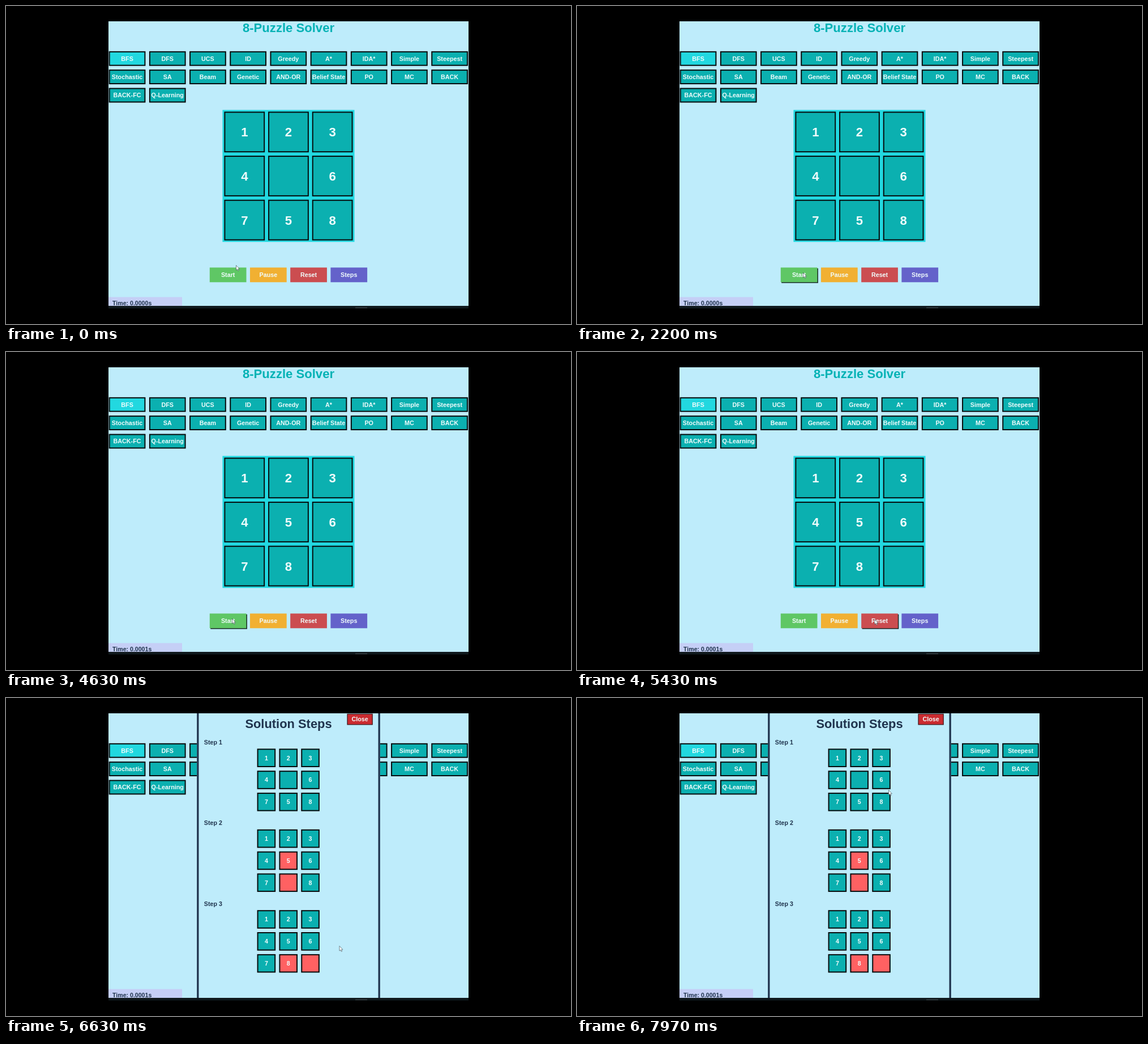
These frames come from a looping animation (998x561 px, 8 s). An HTML page:

```html
<!DOCTYPE html>
<html lang="en">
<head>
<meta charset="utf-8">
<title>Puzzle solver</title>
<style>
html, body { margin: 0; width: 100%; height: 100%; overflow: hidden; background: #000; }
svg { display: block; width: 100%; height: 100%; }
text { font-family: "Liberation Sans", Arial, sans-serif; font-weight: bold; }
</style>
</head>
<body>
<svg id="stage" viewBox="0 0 998 561"></svg>
<script>
const LOOP = 8000;
const NS = "http://www.w3.org/2000/svg";
const SKY = "#beecfb", TEAL = "#0bb0b0", CYAN = "#22d8e0", INK = "#1f334d", PALE = "#f0fcfc";
const UNIT = 0.6472; // app pixels to stage pixels
const BTN_W = 100 * UNIT, BTN_H = 40 * UNIT, BTN_STEP = 110 * UNIT;

const stage = document.getElementById("stage");

function add(parent, tag, attrs) {
  const el = document.createElementNS(NS, tag);
  for (const key in attrs) el.setAttribute(key, attrs[key]);
  parent.appendChild(el);
  return el;
}

const group = parent => add(parent, "g", {});

function rect(parent, x, y, width, height, fill) {
  return add(parent, "rect", { x, y, width, height, fill });
}

// Filled box whose border lies inside its edges.
function box(parent, x, y, w, h, fill, line = 2, stroke = "#050b0c") {
  return add(parent, "rect", {
    x: x + line / 2, y: y + line / 2, width: w - line, height: h - line,
    fill, stroke, "stroke-width": line
  });
}

function label(parent, str, x, midY, size, fill, anchor = "middle") {
  const el = add(parent, "text", {
    x, y: midY + size * 0.36, "font-size": size, fill, "text-anchor": anchor
  });
  el.textContent = str;
  return el;
}

function tile(parent, x, y, side, size, fill) {
  box(parent, x, y, side, side, fill);
  return label(parent, "", x + side / 2, y + side / 2, size, PALE);
}

const show = (el, on) => el.setAttribute("visibility", on ? "visible" : "hidden");

// App window
rect(stage, 0, 0, 998, 561, "#000");
rect(stage, 181, 27, 636, 502, SKY);
rect(stage, 181, 529, 636, 4.6, "#10191d");
rect(stage, 617, 531.8, 21, 1, "#4a5254");
label(stage, "8-Puzzle Solver", 499, 38.2, 22.1, "#04b2b5");

const methods = ["BFS", "DFS", "UCS", "ID", "Greedy", "A*", "IDA*", "Simple", "Steepest",
  "Stochastic", "SA", "Beam", "Genetic", "AND-OR", "Belief State", "PO", "MC", "BACK",
  "BACK-FC", "Q-Learning"];
methods.forEach((name, i) => {
  const x = 181.7 + (i % 9) * BTN_STEP;
  const y = 79.8 + Math.floor(i / 9) * 50 * UNIT;
  box(stage, x, y, BTN_W, BTN_H, i ? TEAL : CYAN);
  label(stage, name, x + BTN_W / 2, y + BTN_H / 2, 10.75, PALE);
});

// Main board
const boards = ["1234 6758", "1234567 8", "12345678 "];
rect(stage, 382.4, 183.4, 233.1, 232.8, CYAN);
const cells = [...boards[0]].map((_, i) =>
  tile(stage, 385.4 + (i % 3) * 120 * UNIT, 186.4 + Math.floor(i / 3) * 120 * UNIT, 71.8, 22.2, TEAL));

// Controls
const controls = [["Start", "#5fc765"], ["Pause", "#f1b032"], ["Reset", "#cb4d50"], ["Steps", "#6462ca"]];
const shadows = controls.map(([name, fill], i) => {
  const x = 359.8 + i * BTN_STEP, y = 461.4;
  const shadow = rect(stage, x + 1.4, y + 1.4, BTN_W, BTN_H, "#14201f");
  rect(stage, x, y, BTN_W, BTN_H, fill);
  label(stage, name, x + BTN_W / 2, y + BTN_H / 2 - 0.1, 10.75, PALE);
  return shadow;
});

rect(stage, 181, 513.5, 130, 15.5, "#c5cff6");
const clock = label(stage, "", 188, 524.4, 10.6, INK, "start");

// Solution panel
const panel = group(stage);
rect(panel, 337.2, 27, 323.6, 502, SKY);
rect(panel, 337.2, 27, 3.3, 502, INK);
rect(panel, 657.5, 27, 3.3, 502, INK);
label(panel, "Solution Steps", 499, 44.8, 21.9, INK);
box(panel, 602.4, 27.7, 45.4, 19.8, "#cb2b30", 1.2, "#3a1518");
label(panel, "Close", 625.2, 37.5, 10.75, PALE);
boards.forEach((board, n) => {
  const top = 89.4 + n * 142.4;
  label(panel, "Step " + (n + 1), 349.8, top - 11.4, 10.7, INK, "start");
  [...board].forEach((digit, i) => {
    const moved = n && digit !== boards[n - 1][i];
    const x = 443.6 + (i % 3) * 60 * UNIT, y = top + Math.floor(i / 3) * 60 * UNIT;
    tile(panel, x, y, 32.6, 10.75, moved ? "#ff6162" : TEAL).textContent = digit;
  });
});

// Pointer
const pointer = group(stage);
add(pointer, "path", {
  d: "M0 0V8.6L2 6.9L3.3 9.8L4.7 9.2L3.4 6.3H6Z",
  fill: "#fbffff", stroke: "#46555c", "stroke-width": 0.7
});
const busy = add(pointer, "circle", {
  cx: 7, cy: 2.3, r: 2.9, fill: "none", stroke: "#1689cf", "stroke-width": 1.7
});

// Time, x, y of the pointer
const path = [[0, 406.5, 457.5], [500, 406.5, 457.5], [1100, 399.5, 470.5], [4900, 399.5, 470.5],
  [5800, 599, 472.5], [6430, 599, 472.5], [6630, 589, 437.5], [7700, 550.5, 162.5], [LOOP, 550.5, 162.5]];

function pointerAt(t) {
  const i = path.findIndex(p => p[0] > t);
  const [t0, x0, y0] = path[i - 1], [t1, x1, y1] = path[i];
  const u = (t - t0) / (t1 - t0), k = u * u * (3 - 2 * u);
  return [x0 + (x1 - x0) * k, y0 + (y1 - y0) * k];
}

function draw(t) {
  const board = boards[t < 2800 ? 0 : t < 3700 ? 1 : 2];
  cells.forEach((cell, i) => { cell.textContent = board[i]; });
  clock.textContent = t < 2600 ? "Time: 0.0000s" : "Time: 0.0001s";
  show(panel, t >= 6400);

  const [x, y] = pointerAt(t);
  pointer.setAttribute("transform", `translate(${x} ${y})`);
  show(busy, t >= 2600 && t < 3600);
  shadows.forEach((shadow, i) => {
    const left = 359.8 + i * BTN_STEP;
    show(shadow, t < 6400 && y > 461.4 && y < 487.3 && x > left && x < left + BTN_W);
  });
}

function tick(now) {
  draw(now % LOOP);
  requestAnimationFrame(tick);
}
draw(0);
requestAnimationFrame(tick);
</script>
</body>
</html>
```
